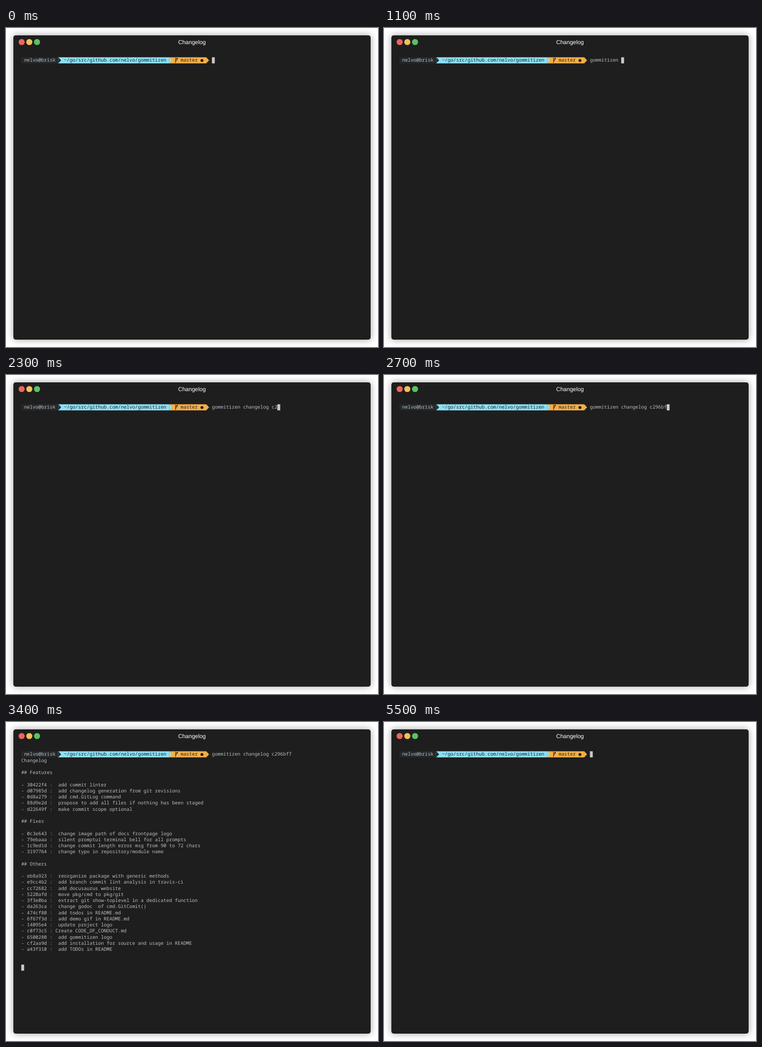
An HTML page for the animation above (7500 ms loop, 808 by 693 pixels).

```html
<!DOCTYPE html>
<html lang="en">
<head>
<meta charset="utf-8">
<title>Changelog</title>
<style>
  html, body { margin: 0; width: 100%; height: 100%; overflow: hidden; background: #fff; }
  .window {
    position: absolute; left: 16px; top: 16px; width: 776px; height: 661px;
    border-radius: 5px; background: #1e1e1e; box-shadow: 0 0 15px rgba(0, 0, 0, .38);
  }
  svg { position: absolute; left: 0; top: 0; width: 808px; height: 693px; }
  text {
    font: 10.3px "Noto Sans Mono", "DejaVu Sans Mono", monospace;
    font-variant-ligatures: none; text-rendering: geometricPrecision;
    white-space: pre; fill: #bebebe;
  }
  .title { font: 12.4px "Liberation Sans", Arial, sans-serif; fill: #fff; text-anchor: middle; }
  .dark { fill: #1b2226; }
</style>
</head>
<body>
<div class="window"></div>
<svg viewBox="0 0 808 693">
  <circle cx="34" cy="30.5" r="6.6" fill="#ed655f"/>
  <circle cx="50.6" cy="30.5" r="6.6" fill="#f6be59"/>
  <circle cx="67.4" cy="30.5" r="6.6" fill="#59c35e"/>
  <text class="title" x="404" y="35.3">Changelog</text>
  <g id="screen"></g>
</svg>
<script>
const LOOP = 7500, STEP = 100;
const CELL = 6.18, ROW = 13.24, LEFT = 33.2, TOP = 63.6;
const PROMPT_END = 67;
const COMMAND = 'gommitizen changelog c296bf7';
const OUTPUT = `Changelog

## Features

- 30422f4 :  add commit linter
- d07985d :  add changelog generation from git revisions
- 0d8a279 :  add cmd.GitLog command
- 88d9e2d :  propose to add all files if nothing has been staged
- d22649f :  make commit scope optional

## Fixes

- 0c3e643 :  change image path of docs frontpage logo
- 79ebaaa :  silent promptui terminal bell for all prompts
- 1c9ed1d :  change commit length error msg from 90 to 72 chars
- 3197764 :  change typo in repository/module name

## Others

- eb8a923 :  reorganize package with generic methods
- e9cc4b2 :  add branch commit lint analysis in travis-ci
- cc72682 :  add docusaurus website
- 5220afd :  move pkg/cmd to pkg/git
- 3f3e0ba :  extract git show-toplevel in a dedicated function
- da263ca :  change godoc  of cmd.GitComit()
- 474cf80 :  add todos in README.md
- 6f67f3d :  add demo gif in README.md
- 14095e4 :  update project logo
- c0f73c5 : Create CODE_OF_CONDUCT.md
- 6500280 :  add gommitizen logo
- cf2aa9d :  add installation for source and usage in README
- a43f310 :  add TODOs in README`.split('\n');

const screen = document.getElementById('screen');
const colX = col => LEFT + col * CELL;
const rowY = row => TOP + row * ROW;

function add(parent, tag, attrs, content = '') {
  const el = document.createElementNS('http://www.w3.org/2000/svg', tag);
  for (const key in attrs) el.setAttribute(key, attrs[key]);
  el.textContent = content;
  parent.append(el);
  return el;
}

const write = (parent, col, row, content, cls = '') =>
  add(parent, 'text', { x: colX(col), y: rowY(row) + 9.8, class: cls }, content);

const block = (parent, col, row, cols, fill) =>
  add(parent, 'rect', { x: colX(col), y: rowY(row), width: cols * CELL, height: ROW, fill });

function arrow(parent, col, fill) {
  const x = colX(col), y = rowY(0);
  add(parent, 'path', { d: `M${x} ${y}l${CELL} ${ROW / 2}l${-CELL} ${ROW / 2}z`, fill });
}

function prompt(row) {
  const g = add(screen, 'g', { transform: `translate(0 ${row * ROW})` });
  const host = '#25292b', path = '#8de0f6', branch = '#f8ae47';
  block(g, 0, 0, 13, host);
  block(g, 13, 0, 39, path);
  block(g, 52, 0, 13, branch);
  arrow(g, 13, host);
  arrow(g, 52, path);
  arrow(g, 65, branch);
  write(g, 1, 0, 'nelvo@brisk');
  write(g, 15, 0, '~/go/src/github.com/nelvo/gommitizen', 'dark');
  add(g, 'path', {
    d: 'M368.4 64.6V75.8M368.4 72.6C368.6 70.4 371.6 71 371.6 66.4M370 67.4L371.7 65.4L373.3 67.4',
    fill: 'none', stroke: '#1b2226', 'stroke-width': 1.2
  });
  write(g, 56, 0, 'master', 'dark');
  add(g, 'circle', { cx: colX(63.5), cy: 70.6, r: 3.2, class: 'dark' });
  return g;
}

prompt(0);
const typed = write(screen, PROMPT_END, 0, '');
const output = add(screen, 'g', {});
OUTPUT.forEach((line, i) => write(output, 0, i + 1, line));
const mark = block(screen, 0, 35, 1, '#b4b4b4');
const nextPrompt = prompt(36);
const cursor = block(screen, 0, 0, 1, '#c9c9c9');

const show = (el, on) => el.setAttribute('visibility', on ? 'visible' : 'hidden');

function cursorCell(t, count) {
  if (t < 3300) return [PROMPT_END + count, 0];
  if (t < 3400) return [0, 1];
  if (t < 3500) return [0, 35];
  return t < 5500 ? [PROMPT_END, 36] : [PROMPT_END, 0];
}

function render(t) {
  const cleared = t >= 5500;
  const count = cleared ? 0 : Math.min(COMMAND.length, Math.floor(t / STEP));
  typed.textContent = COMMAND.slice(0, count);
  show(output, t >= 3400 && !cleared);
  show(mark, t >= 3500 && !cleared);
  show(nextPrompt, t >= 3500 && !cleared);
  const [col, row] = cursorCell(t, count);
  cursor.setAttribute('x', colX(col));
  cursor.setAttribute('y', rowY(row));
}

const start = performance.now();
function tick() {
  render((performance.now() - start) % LOOP);
  requestAnimationFrame(tick);
}
tick();
</script>
</body>
</html>
```
